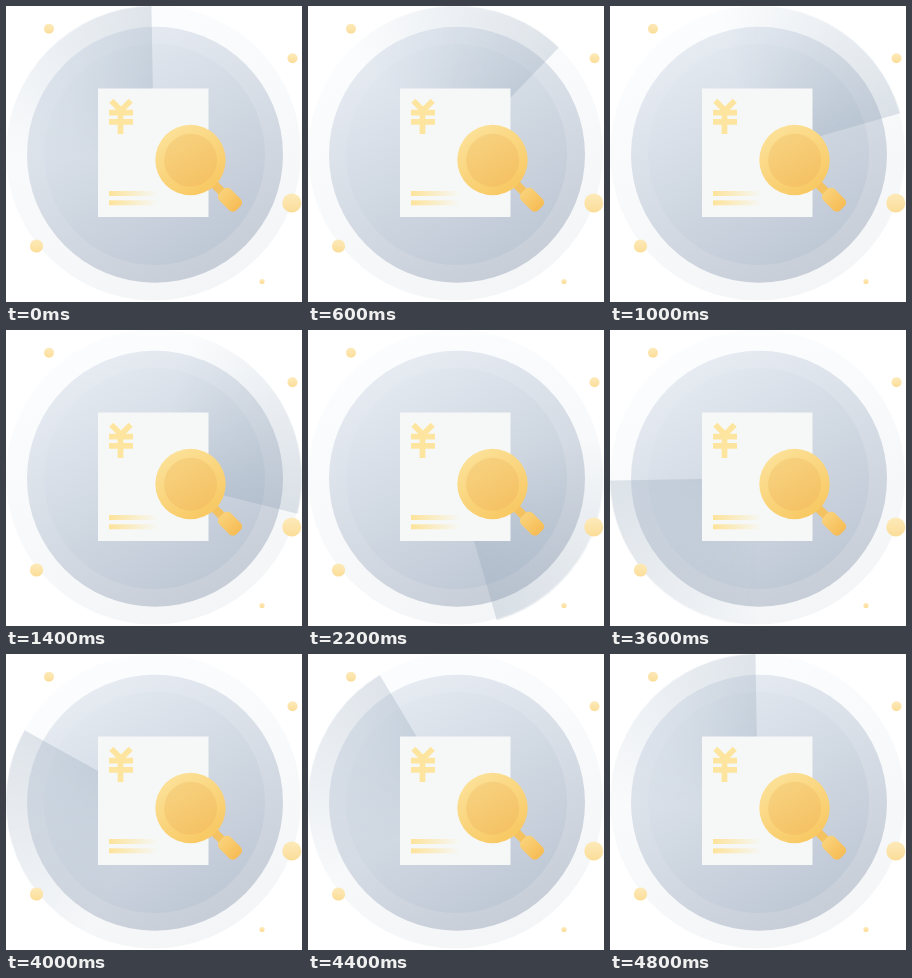
An HTML page that plays this animation: 296x296 px, repeating every 5 s.

```html
<!DOCTYPE html>
<html lang="en">
<head>
<meta charset="utf-8">
<title>Bill scan</title>
<style>
  html, body { margin: 0; width: 100%; height: 100%; overflow: hidden; background: #fff; }
  .stage { position: relative; width: 296px; height: 296px; overflow: hidden; }
  svg, .sweep { position: absolute; left: 0; top: 0; width: 296px; height: 296px; }
  .sweep {
    border-radius: 50%;
    background: conic-gradient(rgba(130, 152, 174, 0) 270deg, rgba(130, 152, 174, .24) 360deg);
    animation: sweep 5s steps(25, end) infinite;
  }
  @keyframes sweep {
    from { transform: rotate(-1deg); }
    to { transform: rotate(374deg); }
  }
</style>
</head>
<body>
<div class="stage">
  <svg viewBox="0 0 296 296">
    <defs>
      <linearGradient id="rim" x1=".3" y1="0" x2=".7" y2="1">
        <stop stop-color="#fcfdfe"/><stop offset="1" stop-color="#f3f5f7"/>
      </linearGradient>
      <linearGradient id="ring" x1=".25" y1="0" x2=".75" y2="1">
        <stop stop-color="#e8edf4"/><stop offset="1" stop-color="#c5ccd6"/>
      </linearGradient>
      <linearGradient id="disc" x1=".2" y1="0" x2=".8" y2="1">
        <stop stop-color="#e4eaf1"/><stop offset="1" stop-color="#bcc6d3"/>
      </linearGradient>
    </defs>
    <circle cx="147.5" cy="147" r="147.5" fill="url(#rim)"/>
    <circle cx="149" cy="148.7" r="128" fill="url(#ring)"/>
    <circle cx="148.5" cy="148.5" r="110.5" fill="url(#disc)"/>
  </svg>

  <div class="sweep"></div>

  <svg viewBox="0 0 296 296">
    <defs>
      <linearGradient id="gold" x1=".15" y1="0" x2=".8" y2="1">
        <stop stop-color="#fce39c"/><stop offset="1" stop-color="#f8c75f"/>
      </linearGradient>
      <linearGradient id="lens" x1=".2" y1="0" x2=".8" y2="1">
        <stop stop-color="#f7d281"/><stop offset="1" stop-color="#f5c162"/>
      </linearGradient>
      <linearGradient id="grip" x1="0" y1="0" x2="1" y2="0">
        <stop stop-color="#fad27a"/><stop offset="1" stop-color="#f6bc55"/>
      </linearGradient>
      <linearGradient id="dot" x1="0" y1="0" x2="0" y2="1">
        <stop stop-color="#fdeaba"/><stop offset="1" stop-color="#fbdd98"/>
      </linearGradient>
      <linearGradient id="fade">
        <stop stop-color="#fde39a"/><stop offset="1" stop-color="#fde39a" stop-opacity="0"/>
      </linearGradient>
    </defs>

    <path d="M92 82.5H202.5V211H92z" fill="#f6f8f7"/>
    <g fill="none" stroke="#fde5a0" stroke-width="5.8">
      <path d="M105.3 94.8L115 104.5L124.7 94.8M114.5 103V128"/>
      <path d="M103 106.7H127M103 115.8H127"/>
    </g>
    <g fill="url(#fade)">
      <rect x="103" y="185" width="49" height="5"/>
      <rect x="103" y="194.3" width="49" height="5"/>
    </g>

    <path d="M206 176L218 188" stroke="#f5c262" stroke-width="8.5"/>
    <rect x="-12" y="-8" width="24" height="16" rx="5" fill="url(#grip)"
      transform="translate(224 193.7) rotate(45)"/>
    <circle cx="184.5" cy="154" r="35.2" fill="url(#gold)"/>
    <circle cx="184.6" cy="154.3" r="26.5" fill="url(#lens)"/>

    <g fill="url(#dot)">
      <circle cx="43" cy="22.8" r="5"/>
      <circle cx="286.5" cy="52.3" r="5"/>
      <circle cx="285.8" cy="197" r="9.5"/>
      <circle cx="30.5" cy="240" r="6.6"/>
      <circle cx="256" cy="275.5" r="2.6"/>
    </g>
  </svg>
</div>
</body>
</html>
```
